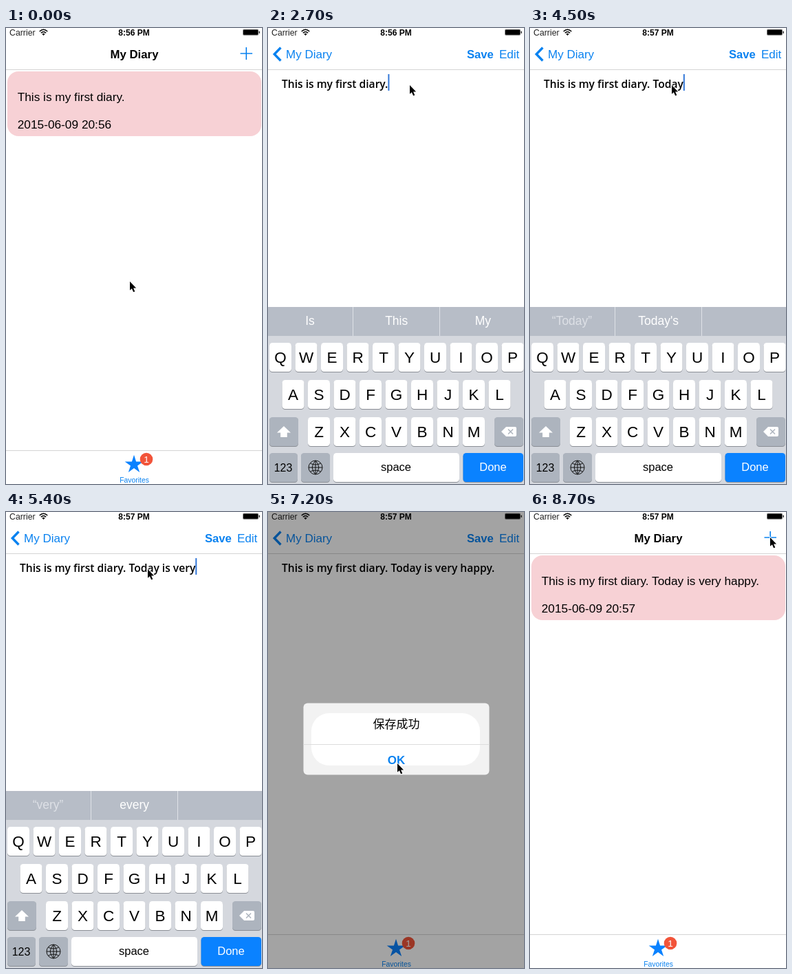
An HTML page for the animation above (9 s loop, 372x662 px).

```html
<!DOCTYPE html>
<html lang="en">
<head>
<meta charset="utf-8">
<title>My Diary</title>
<style>
  html, body { margin: 0; width: 100%; height: 100%; overflow: hidden; background: #fff; }
  svg { display: block; width: 372px; height: 662px; font-family: "Liberation Sans", Arial, sans-serif; }
  text { white-space: pre; }
  .note { font-family: "Open Sans", "Noto Sans", sans-serif; font-weight: 600; }
  .cjk { font-family: "Noto Sans CJK SC", "Noto Sans CJK", sans-serif; font-weight: 500; }
</style>
</head>
<body>
<svg id="stage" viewBox="0 0 372 662"></svg>
<script>
const stage = document.getElementById('stage');
const STEP = 300, STEPS = 30;
const BLUE = '#0a82f0', FIRST = 'This is my first diary.', MORE = ' Today is very happy.';

// Characters of MORE typed by a given step.
const typing = [[11, 2], [12, 3], [13, 4], [14, 5], [15, 6], [16, 9], [17, 11], [18, 14], [19, 18], [20, 21]];

// Pointer tip: step, x, y; straight moves in between.
const pointerPath = [
  [0, 180, 368], [2, 220, 94], [5, 220, 94], [7, 206, 83], [20, 206, 83],
  [22, 308, 39], [24, 188, 365], [25, 188, 365], [27, 40, 39], [29, 349, 37]
];

const suggestions = {
  '': ['Is', 'This', 'My'],
  T: ['“T”', 'The', 'This'],
  To: ['“To”', 'Today', 'Too'],
  Tod: ['“Tod”', 'Today', 'Todd'],
  Toda: ['“Toda”', 'Today', 'Today\'s'],
  Today: ['“Today”', 'Today\'s', ''],
  is: ['“is”', 'isn\'t', 'it'],
  v: ['“v”', 'very', 'via'],
  very: ['“very”', 'every', ''],
  hap: ['“hap”', 'happy', 'happen']
};

const rect = (x, y, w, h, fill, r = 0) =>
  `<rect x="${x}" y="${y}" width="${w}" height="${h}" rx="${r}" fill="${fill}"/>`;
const line = (d, color, width = 1) =>
  `<path d="${d}" fill="none" stroke="${color}" stroke-width="${width}"/>`;
const shape = (d, fill, extra = '') => `<path d="${d}" fill="${fill}" ${extra}/>`;
const text = (s, x, y, size, fill = '#000', extra = '') =>
  `<text x="${x}" y="${y}" font-size="${size}" fill="${fill}" ${extra}>${s}</text>`;
const centered = (s, x, y, size, fill, extra = '') =>
  text(s, x, y, size, fill, `text-anchor="middle" ${extra}`);
const BOLD = 'font-weight="bold"';

function statusBar(clock) {
  return text('Carrier', 5, 10.5, 12.3, '#222') +
    line('M48.7 5Q54.5 -.6 60.3 5M50.8 7.2Q54.5 3.7 58.2 7.2', '#000', 1.5) +
    shape('M52.4 8.7Q54.5 7 56.6 8.7L54.5 11Z', '#000') +
    centered(clock, 186, 10.5, 12, '#000', BOLD) +
    rect(344, 1.8, 23, 9, '#777', 1.8) + rect(345, 2.8, 21, 7, '#000', 1) +
    rect(367.5, 4.5, 1.5, 3.5, '#333', .7);
}

function tabBar() {
  const star = Array.from({ length: 10 }, (_, i) => {
    const a = i * Math.PI / 5, r = i % 2 ? 5.3 : 14;
    return `${(186 + r * Math.sin(a)).toFixed(1)} ${(633.8 - r * Math.cos(a)).toFixed(1)}`;
  }).join('L');
  return rect(0, 613, 372, 1, '#d4d4d4') + shape(`M${star}Z`, '#0a82ff') +
    `<circle cx="204" cy="626" r="9.3" fill="#f2543a"/>` +
    centered('1', 204, 631, 13.5, '#fff') +
    centered('Favorites', 186.5, 660, 10.4, BLUE);
}

function listView(entry, date) {
  return centered('My Diary', 186.5, 44, 16.8, '#000', BOLD) +
    line('M340.5 37H358M349.2 28V46', BLUE, 1.6) +
    rect(2, 63, 369, 94, '#f7d1d5', 16) +
    text(entry, 16.7, 106, 17.25) + text(date, 16.7, 146, 17.3);
}

function detailView(entry, savePressed) {
  return line('M18.5 28.5L9.3 38L18.5 47.5', BLUE, 3.4) +
    text('My Diary', 26, 44, 17, BLUE) +
    text('Save', 289, 44, 16.6, savePressed ? '#cfe3f8' : BLUE, BOLD) +
    text('Edit', 336, 44, 17, BLUE) +
    text(entry, 20, 87, 15.6, '#000', 'class="note" id="note"');
}

function keyCap(x, y, w, fill = '#fff') {
  return rect(x, y + 1, w, 42, '#8b8f96', 4.5) + rect(x, y, w, 42, fill, 4.5);
}

function keyboard(words) {
  const gray = '#adb4be';
  let out = rect(0, 405, 372, 257, '#d5d8de') + rect(0, 405, 372, 42, '#b7bdc7') +
    rect(123, 405, 1, 42, '#dfe2e7') + rect(249, 405, 1, 42, '#dfe2e7');
  words.forEach((word, i) => {
    out += centered(word, 61 + i * 125.7, 430.5, 17.5, word[0] === '“' ? '#dde0e6' : '#fff');
  });
  [['QWERTYUIOP', 2, 457], ['ASDFGHJKL', 20.5, 511], ['ZXCVBNM', 58, 565]].forEach(([letters, x0, y]) => {
    [...letters].forEach((letter, i) => {
      const x = x0 + i * 37.5;
      out += keyCap(x, y, 32) + centered(letter, x + 16, y + 29, 22.5, '#000');
    });
  });
  out += keyCap(2, 565, 42, gray) + shape('M23 578L33 587.5H27.8V594H18.2V587.5H13Z', '#fff') +
    keyCap(329, 565, 42, gray) + shape('M339 586L346 579H359Q361 579 361 581V591Q361 593 359 593H346Z', '#fff') +
    line('M349 582.5L356 589.5M356 582.5L349 589.5', gray, 1.5) +
    keyCap(2, 617, 41, gray) + centered('123', 22, 643.5, 16, '#000') +
    keyCap(48, 617, 42, gray) +
    line('M59 638a10 10 0 1 0 20 0a10 10 0 1 0 -20 0M59 638H79M69 628V648' +
      'M69 628Q59.5 638 69 648M69 628Q78.5 638 69 648M61.5 632Q69 636 76.5 632M61.5 644Q69 640 76.5 644', '#111', 1) +
    keyCap(95, 617, 183) + centered('space', 186, 643, 16.5, '#000') +
    keyCap(283.5, 617, 87.5, '#0a82ff') + centered('Done', 327, 643, 16.5, '#fff');
  return out;
}

function alertBox(pressed) {
  return rect(0, 0, 372, 662, 'rgba(0,0,0,.36)') +
    rect(51.5, 277.5, 270, 104, '#f2f2f2', 6) +
    rect(63, 292, 245, 76, '#fff', 26) +
    (pressed ? shape('M51.5 338H321.5V375.5Q321.5 381.5 315.5 381.5H57.5Q51.5 381.5 51.5 375.5Z', '#e4e4e4') : '') +
    rect(51.5, 337, 270, 1, '#dcdcdc') +
    centered('保存成功', 186.5, 314, 17, '#000', 'class="cjk"') +
    centered('OK', 186.5, 366, 17, BLUE, BOLD);
}

function pointer(step) {
  const next = Math.max(1, pointerPath.findIndex(p => p[0] >= step));
  const [s0, x0, y0] = pointerPath[next - 1], [s1, x1, y1] = pointerPath[next];
  const k = (step - s0) / (s1 - s0);
  return shape('M0 0V12.8L2.9 10.2L5.1 15.3L7.3 14.4L5.1 9.4H9.1Z', '#000',
    `stroke="#fff" stroke-width="1.6" paint-order="stroke" transform="translate(${x0 + (x1 - x0) * k} ${y0 + (y1 - y0) * k})"`);
}

function draw(step) {
  const inDetail = step >= 3 && step < 28;
  const hasKeyboard = step >= 8 && step < 23;
  const typed = typing.reduce((n, [from, count]) => step >= from ? count : n, 0);
  const added = MORE.slice(0, typed);
  const entry = FIRST + added;
  const late = step >= 15;
  const word = added.split(' ').pop();

  stage.innerHTML = rect(0, 0, 372, 662, '#fff') + statusBar(late ? '8:57 PM' : '8:56 PM') +
    rect(0, 60, 372, 1, '#d4d4d4') +
    (inDetail ? detailView(entry, step === 22) : listView(entry, `2015-06-09 20:5${late ? 7 : 6}`)) +
    (hasKeyboard ? keyboard(suggestions[word] || suggestions['']) : tabBar()) +
    (step >= 23 && step < 26 ? alertBox(step === 25) : '');

  if (hasKeyboard && step !== 10 && step !== 22) {
    const end = 20 + document.getElementById('note').getComputedTextLength();
    stage.insertAdjacentHTML('beforeend', rect(end, 67, 2, 24, '#3478d8'));
  }
  stage.insertAdjacentHTML('beforeend', pointer(step));
}

let shown = -1;
function tick() {
  const step = Math.floor(performance.now() / STEP) % STEPS;
  if (step !== shown) draw(shown = step);
  requestAnimationFrame(tick);
}
tick();
</script>
</body>
</html>
```
